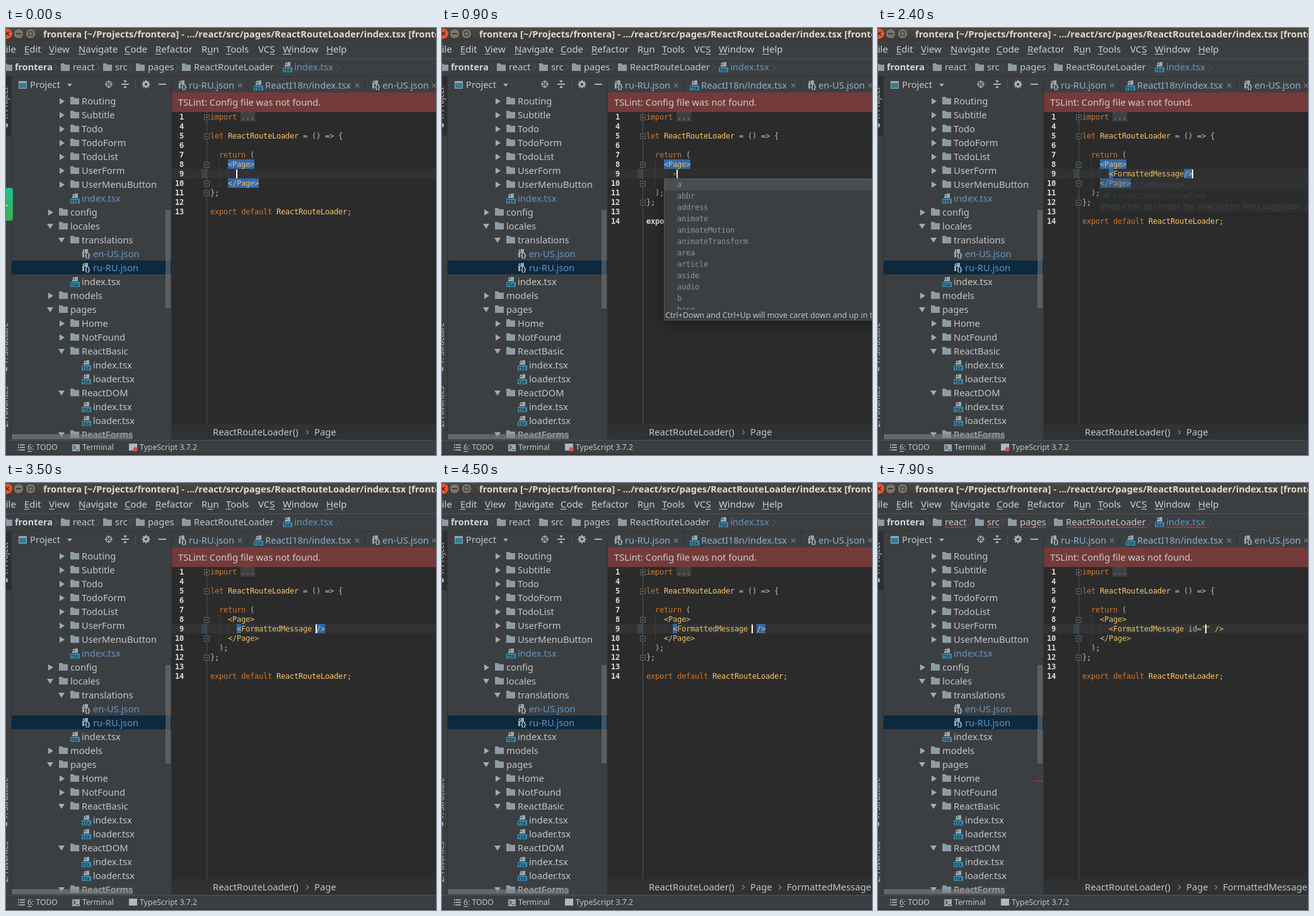
These frames come from a looping animation (682 px wide and 676 px high, 8000 ms). An HTML page with a canvas:

```html
<!DOCTYPE html>
<html>
<head>
<meta charset="utf-8">
<style>
html, body { margin: 0; width: 100%; height: 100%; overflow: hidden; background: #3c3f41; }
canvas { display: block; }
</style>
</head>
<body>
<canvas id="stage" width="682" height="676"></canvas>
<script>
const ctx = document.getElementById('stage').getContext('2d');
const LOOP = 8000, CELL = 7, ROW = 15, CODE_X = 324, CODE_Y = 133;
const PANEL = '#3c3f41', EDITOR = '#2b2b2b', TEXT = '#c4c6c8', BLUE = '#6394c2', TAB_TEXT = '#93b0cb', ICON = '#9aa7b0';
const PLAIN = '#b6c1cd', KEYWORD = '#cc7832', NAME = '#ffc66d', TAG = '#e8bf6a', MATCH = '#3268ab', ERROR = '#d0484c';

// Line being typed: [start, text, caret column, tag pair highlighted]
const TYPING = [
  [0, '', 0, 0], [300, '<', 1, 0], [1400, '<F', 2, 0], [1600, '<Fm', 3, 0],
  [2300, '<FormattedMessage/>', 19, 1], [3000, '<FormattedMessage/>', 19, 0],
  [3300, '<FormattedMessage/>', 17, 1], [3500, '<FormattedMessage />', 18, 1],
  [3800, '<FormattedMessage  />', 19, 1], [4200, '<FormattedMessage  />', 18, 1],
  [5300, '<FormattedMessage i />', 19, 1], [5700, '<FormattedMessage id />', 20, 1],
  [6100, '<FormattedMessage id={} />', 22, 0], [6700, '<FormattedMessage id= />', 21, 0],
  [6900, '<FormattedMessage id="" />', 22, 0]
];

// [centre y, level, kind, label]: + closed folder, - open folder, t TSX file, j JSON file
const TREE = `2+Routing 2+Subtitle 2+Todo 2+TodoForm 2+TodoList 2+UserForm 2+UserMenuButton 2tindex.tsx
1+config 1-locales 2-translations 3jen-US.json 3jru-RU.json 2tindex.tsx 1+models 1-pages 2+Home 2+NotFound
2-ReactBasic 3tindex.tsx 3tloader.tsx 2-ReactDOM 3tindex.tsx 3tloader.tsx 2-ReactForms`
  .split(/\s+/).map((s, i) => [116 + 22 * i, +s[0], s[1], s.slice(2)]);

const MENU = [[-8, 'File', 0], [29, 'Edit', 0], [68, 'View', 0], [115, 'Navigate', 0], [188, 'Code', 0],
  [237, 'Refactor', 0], [310, 'Run', 1], [349, 'Tools', 0], [400, 'VCS', 2], [439, 'Window', 0], [508, 'Help', 0]];
const TAGS = 'a abbr address animate animateMotion animateTransform area article aside audio b base'.split(' ');

function rect(x, y, w, h, color) {
  ctx.fillStyle = color;
  ctx.fillRect(x, y, w, h);
}

function poly(color, ...pts) {
  ctx.fillStyle = color;
  ctx.beginPath();
  for (let i = 0; i < pts.length; i += 2) ctx.lineTo(pts[i], pts[i + 1]);
  ctx.fill();
}

function line(color, width, ...pts) {
  ctx.strokeStyle = color;
  ctx.lineWidth = width;
  ctx.beginPath();
  for (let i = 0; i < pts.length; i += 2) ctx.lineTo(pts[i], pts[i + 1]);
  ctx.stroke();
}

function disc(x, y, r, color) {
  ctx.fillStyle = color;
  ctx.beginPath();
  ctx.arc(x, y, r, 0, 7);
  ctx.fill();
}

function ring(x, y, r, color, width) {
  ctx.strokeStyle = color;
  ctx.lineWidth = width;
  ctx.beginPath();
  ctx.arc(x, y, r, 0, 7);
  ctx.stroke();
}

// Baselines sit on whole pixels to keep the text crisp
function label(text, x, midY, color = TEXT, size = 14.7, weight = '') {
  ctx.font = `${weight} ${size}px "Noto Sans", sans-serif`;
  ctx.fillStyle = color;
  ctx.fillText(text, x, Math.round(midY + size * 0.35));
}

// Monospaced text on a 7 px grid
function mono(text, x, baseline, color, weight = '') {
  ctx.font = `${weight} 12px "DejaVu Sans Mono", monospace`;
  ctx.letterSpacing = '-0.224px';
  ctx.fillStyle = color;
  ctx.fillText(text, x, baseline);
  ctx.letterSpacing = '0px';
}

function code(col, row, ...parts) {
  for (let i = 0; i < parts.length; i += 2) {
    mono(parts[i], CODE_X + CELL * col, CODE_Y + ROW * row + 12, parts[i + 1]);
    col += parts[i].length;
  }
}

function mark(col, row, cells) {
  rect(CODE_X + CELL * col, CODE_Y + ROW * row, CELL * cells, ROW, MATCH);
}

function wave(x, y, width) {
  const pts = [];
  for (let i = 0; i <= width; i += 2) pts.push(x + i, y + (i % 4 ? -1 : 1));
  line(ERROR, 1, ...pts);
}

function folder(x, y) {
  poly('#8d9ba5', x, y - 6, x + 5, y - 6, x + 7, y - 4, x + 14, y - 4, x + 14, y + 6, x, y + 6);
}

function page(x, y, bottom) {
  poly(ICON, x + 7, y - 8, x + 12, y - 8, x + 12, y + bottom, x + 3, y + bottom, x + 3, y - 4, x + 7, y - 4);
  poly('#d0d7dc', x + 3, y - 5, x + 6, y - 8, x + 6, y - 5);
}

function tsxFile(x, y) {
  page(x, y, -1);
  rect(x, y, 15, 8, '#3c8cae');
  label('TSX', x + 0.7, y + 4.2, '#1d2f38', 6.8, 'bold');
}

function jsonFile(x, y, bg) {
  page(x - 3, y, 5);
  rect(x + 3, y - 2, 10, 10, bg);
  label('{}', x + 4, y + 2, '#b9c2c8', 11, 'bold');
}

function arrow(x, y, open) {
  if (open) poly('#a6a8aa', x - 5, y - 4, x + 5, y - 4, x, y + 4);
  else poly('#a6a8aa', x - 3, y - 5, x + 5, y, x - 3, y + 5);
}

function chevron(x, y, r, color) {
  line(color, 1, x - r / 2, y - r, x + r / 2, y, x - r / 2, y + r);
}

function cross(x, y) {
  line('#7c7f81', 1.2, x - 3, y - 3, x + 3, y + 3);
  line('#7c7f81', 1.2, x + 3, y - 3, x - 3, y + 3);
}

function header(t) {
  const bar = ctx.createLinearGradient(0, 0, 0, 20);
  bar.addColorStop(0, '#4a4842');
  bar.addColorStop(1, '#3c3b37');
  rect(0, 0, 682, 20, bar);
  disc(2, 9, 8, '#e4572f');
  line('#5c2415', 1.6, -1, 6, 5, 12);
  line('#5c2415', 1.6, 5, 6, -1, 12);
  for (const x of [20, 39]) {
    disc(x, 9, 8, '#77756c');
    ring(x, 9, 8, '#2f2e2a', 1);
  }
  rect(16, 8, 8, 2, '#3c3b37');
  ctx.strokeRect(36, 6, 6, 6);
  label('frontera [~/Projects/frontera] - .../react/src/pages/ReactRouteLoader/index.tsx [frontera]',
    59, 10, '#dfdbd2', 14.7, 'bold');

  for (const [x, text, key] of MENU) {
    label(text, x, 34, '#cfd0d1', 14.9);
    const before = ctx.measureText(text.slice(0, key)).width;
    rect(x + before, 41, ctx.measureText(text[key]).width, 1, '#cfd0d1');
  }
  rect(0, 48, 682, 1, '#515456');

  for (const x of [-4, 87, 154, 206, 279]) folder(x, 62);
  for (const x of [79, 146, 198, 271, 431, 526]) chevron(x, 62, 6, '#5b5e60');
  label('frontera', 14, 62, '#d3d5d7', 14.4, 'bold');
  label('react', 106, 62);
  label('src', 173, 62);
  label('pages', 225, 62);
  label('ReactRouteLoader', 298, 62);
  tsxFile(439, 62);
  label('index.tsx', 457, 62, BLUE);
  if (t >= 6500) for (const [x, w] of [[106, 36], [173, 20], [225, 42], [298, 128], [457, 64]]) wave(x, 70, w);
  rect(0, 76, 682, 1, '#303234');
}

function sideText(text, bottom) {
  ctx.save();
  ctx.translate(0, bottom);
  ctx.rotate(-Math.PI / 2);
  label(text, 0, -1, TEXT, 12);
  ctx.restore();
}

function projectPanel(t) {
  rect(0, 77, 8, 93, '#2d2f30');
  sideText('1: Project', 146);
  sideText('7: Structure', 532);
  sideText('2: Favorites', 632);
  rect(0, 151, 3, 6, ICON);
  rect(0, 537, 2, 6, ICON);
  rect(8, 77, 1, 575, '#2f3133');

  rect(20, 84, 13, 12, '#9aa7b0');
  rect(21, 87, 11, 8, '#2f7f9c');
  label('Project', 38, 90);
  poly('#a6a8aa', 97, 88, 105, 88, 101, 93);
  ring(163, 89, 4.5, '#afb1b3', 1.4);
  line('#afb1b3', 1.4, 163, 83, 163, 88);
  line('#afb1b3', 1.4, 163, 90, 163, 95);
  line('#afb1b3', 1.4, 157, 89, 162, 89);
  line('#afb1b3', 1.4, 164, 89, 169, 89);
  rect(183, 88, 12, 2, '#afb1b3');
  poly('#afb1b3', 186, 83, 192, 83, 189, 87);
  poly('#afb1b3', 186, 95, 192, 95, 189, 91);
  rect(205, 82, 1, 15, '#515456');
  ring(222, 89, 3.6, '#afb1b3', 3);
  for (let i = 0; i < 8; i++) {
    const a = i * Math.PI / 4, c = Math.cos(a), s = Math.sin(a);
    line('#afb1b3', 2.2, 222 + 4 * c, 89 + 4 * s, 222 + 6.5 * c, 89 + 6.5 * s);
  }
  rect(242, 88, 12, 2, '#afb1b3');

  ctx.save();
  ctx.beginPath();
  ctx.rect(9, 103, 253, 549);
  ctx.clip();
  rect(9, 368, 253, 22, '#0d293e');
  for (const [y, level, kind, text] of TREE) {
    const x = 66 + 18 * level;
    const blue = kind === 'j' || y === 270;
    if (kind === 't') tsxFile(x, y);
    else if (kind === 'j') jsonFile(x + 1, y, y === 380 ? '#0d293e' : PANEL);
    else {
      arrow(x - 14, y, kind === '-');
      folder(x, y - 1);
    }
    label(text, x + 18, y, blue ? BLUE : TEXT);
  }
  if (t >= 5900 && t < 7900) wave(102, 453, 42);
  rect(253, 288, 8, 156, 'rgba(125,128,130,.5)');
  rect(9, 643, 192, 8, 'rgba(125,128,130,.6)');
  if (t >= 6100) rect(248, 471, 14, 1.5, '#b32d31');
  ctx.restore();
  rect(262, 77, 1, 575, '#2f3133');

  if (t < 400) notification();
}

function notification() {
  const green = ctx.createLinearGradient(0, 253, 0, 305);
  green.addColorStop(0, '#22c08a');
  green.addColorStop(1, '#3fae52');
  ctx.fillStyle = green;
  ctx.beginPath();
  ctx.roundRect(-6, 253, 17, 52, 4);
  ctx.fill();
  rect(0, 280, 2, 2, '#d9f3e4');
}

function tabs() {
  rect(383, 77, 1, 26, '#2f3133');
  rect(569, 77, 1, 26, '#2f3133');
  jsonFile(274, 91, PANEL);
  label('ru-RU.json', 290, 91, TAB_TEXT);
  cross(371, 91);
  tsxFile(393, 91);
  label('ReactI18n/index.tsx', 411, 91, TAB_TEXT);
  cross(557, 91);
  jsonFile(581, 91, PANEL);
  label('en-US.json', 597, 91, TAB_TEXT);
  cross(679, 91);
  rect(263, 102, 419, 31, '#743a3a');
  label('TSLint: Config file was not found.', 273, 118, '#cfcccc');
}

function fold(row, plus) {
  const x = 314.5, y = CODE_Y + ROW * row + 4.5;
  rect(x, y, 8, 8, EDITOR);
  ctx.strokeStyle = '#606366';
  ctx.lineWidth = 1;
  ctx.strokeRect(x, y, 8, 8);
  line('#7b7e80', 1, x + 2, y + 4, x + 6, y + 4);
  if (plus) line('#7b7e80', 1, x + 4, y + 2, x + 4, y + 6);
}

function typedLine(t) {
  const [, text, caret, paired] = TYPING.filter(s => s[0] <= t).pop();
  if (paired) {
    mark(6, 6, 1);
    mark(6 + text.indexOf('/>'), 6, 2);
  }
  const [, tag, attr, quoted, end] = text.match(/^(<\w*)(\s*\w*)(=?(?:""|{})?)(.*)$/) || ['', '', '', '', ''];
  code(6, 6, tag, t < 2300 ? '#cf6a5c' : TAG, attr, '#bababa', quoted, quoted.includes('"') ? '#a5c261' : PLAIN, end, TAG);
  if (t >= 5900 && t < 6700) wave(492, 236, 14);
  if (t >= 7100 && t < 7900) wave(527, 236, 14);
  rect(365 + CELL * caret, 224, 2, 14, '#fff');
}

function editor(t) {
  const closed = t >= 100, last = closed ? 11 : 10;
  rect(263, 133, 419, 494, EDITOR);
  rect(263, 223, 419, 15, '#323232');
  rect(310, 223, 8, 15, '#374752');
  rect(318, 133, 1, 494, '#505355');
  for (let row = 0; row <= last; row++) {
    const n = String(row ? row + 3 : 1);
    mono(n, 282 - CELL * n.length, CODE_Y + ROW * row + 12, '#dcdcdc', 'bold');
  }
  [2, 5, 7, closed ? 9 : 8].forEach(row => fold(row));
  fold(0, true);
  rect(338, 208, 1, 45, '#3b3b3b');
  rect(352, 223, 1, 15, '#3b3b3b');

  rect(372, 133, 23, 15, '#3f4143');
  code(0, 0, 'import ', KEYWORD, '...', '#8c8c8c');
  code(0, 2, 'let ', KEYWORD, 'ReactRouteLoader', NAME, ' = () => {', PLAIN);
  code(2, 4, 'return ', KEYWORD, '(', PLAIN);
  if (t < 3000) {
    mark(4, 5, 6);
    mark(4, 7, 7);
  }
  code(4, 5, '<Page>', TAG);
  code(4, 7, '</Page>', TAG);
  if (closed) code(2, 8, ');', PLAIN);
  code(0, closed ? 9 : 8, '};', PLAIN);
  if (t >= 300 && t < 1400) mono('export', CODE_X, CODE_Y + ROW * last + 12, '#dfe3e7', 'bold');
  else code(0, last, 'export', KEYWORD);
  code(6, last, ' default ', KEYWORD, 'ReactRouteLoader', NAME, ';', PLAIN);
  typedLine(t);

  rect(263, 627, 419, 25, '#2f3133');
  label('ReactRouteLoader()', 328, 640);
  chevron(478, 640, 3.5, TEXT);
  label('Page', 489, 640);
  if (t >= 4500 && t < 6500 || t >= 7200) {
    chevron(536, 640, 3.5, TEXT);
    label('FormattedMessage', 547, 640);
  }
}

function popup(x, bottom, items, hint, alpha) {
  ctx.save();
  ctx.globalAlpha = alpha;
  ctx.shadowColor = 'rgba(0,0,0,.45)';
  ctx.shadowBlur = 24;
  ctx.shadowOffsetY = 3;
  rect(x, 238, 682 - x + 20, bottom - 238, PANEL);
  ctx.shadowColor = 'transparent';
  rect(x, 239, 682 - x, 18, '#4b4e50');
  ctx.strokeStyle = '#56595b';
  ctx.lineWidth = 1;
  ctx.strokeRect(x + 0.5, 238.5, 400, bottom - 239);
  ctx.beginPath();
  ctx.rect(x, 238, 400, bottom - 255);
  ctx.clip();
  items.forEach((item, i) => {
    if (items.length < 3) disc(362, 247 + 18 * i, 5, '#3b7382');
    mono(item, 373, 252 + 18 * i, '#8f9294');
  });
  ctx.restore();
  ctx.globalAlpha = alpha;
  label(hint, 354, bottom - 8, '#c0c2c4', 12.5);
  ctx.globalAlpha = 1;
}

function popups(t) {
  const step = Math.floor(t / 100);
  const move = 'Ctrl+Down and Ctrl+Up will move caret down and up in the editor';
  const press = 'Press Ctrl+. to choose the selected (or first) suggestion and insert a dot afterwards';
  if (t >= 400 && t < 1400) popup(352, 463, TAGS, move, Math.min(1, (step - 3) / 5));
  else if (t >= 1400 && t < 2500) {
    const alpha = step < 23 ? 1 : step === 23 ? 0.5 : 0.16;
    popup(352, 291, ['FormattedMessage', 'FormattedRelativeTime'], t < 2100 ? move : press, alpha);
  }
}

function statusBar(t) {
  rect(0, 652, 682, 22, PANEL);
  rect(0, 652, 682, 1, '#515456');
  for (const y of [660, 664, 668]) {
    rect(19, y - 1, 2, 2, ICON);
    rect(22, y - 1, 8, 2, ICON);
  }
  label('6: TODO', 34, 664, TEXT, 12.2);
  rect(34, 670, 7, 1, TEXT);
  rect(105, 659, 12, 11, ICON);
  line(PANEL, 1.3, 107, 661, 110, 664, 107, 667);
  rect(111, 667, 4, 1, PANEL);
  label('Terminal', 121, 664, TEXT, 12.2);
  rect(195, 658, 13, 11, '#afb9c0');
  if (t < 2900 || t >= 5900 && t < 7900) disc(205, 667, 3.5, '#d9534a');
  label('TypeScript 3.7.2', 212, 664, TEXT, 12.3);
  rect(0, 674, 682, 2, '#402f3b');
}

function draw(now) {
  const t = now % LOOP;
  rect(0, 0, 682, 676, PANEL);
  header(t);
  projectPanel(t);
  tabs();
  editor(t);
  popups(t);
  statusBar(t);
  requestAnimationFrame(draw);
}
requestAnimationFrame(draw);
</script>
</body>
</html>
```
